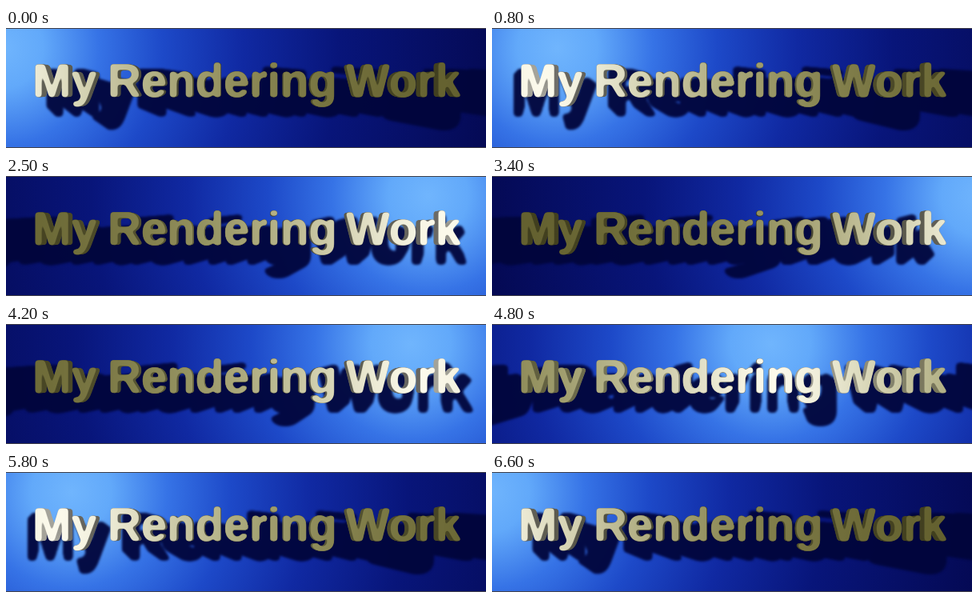
Write an HTML page with a canvas that moves like this. It is 600 px wide and 150 px high and loops after 6700 ms.

```html
<!DOCTYPE html>
<html lang="en">
<head>
<meta charset="utf-8">
<title>My Rendering Work</title>
<style>
html, body { margin: 0; width: 600px; height: 150px; overflow: hidden; background: #02065a; }
canvas { display: block; }
</style>
</head>
<body>
<canvas id="stage" width="600" height="150"></canvas>
<script>
const W = 600, H = 150, PAD = 12, RES = 2;
const LOOP = 6700, TURN = 3300;
const VIEW = { x: 300, y: 75 };
const BACK = 0.975;                       // scale of the rear of the lettering
const CAST = [1.21, 1.36], LIGHT_Y = 18;  // shadow scales of rear and front

function layer(w, h) {
  const c = document.createElement('canvas');
  c.width = w;
  c.height = h;
  return c.getContext('2d');
}
const ctx = document.getElementById('stage').getContext('2d');
const shade = layer(W + 2 * PAD, H + 2 * PAD);
const tint = layer(W * RES, H * RES);
const mask = makeMask();

// Lettering with corners rounded by blurring and thresholding
function makeMask() {
  const raw = layer(W * RES, H * RES), soft = layer(W * RES, H * RES);
  raw.scale(RES, RES);
  raw.font = 'bold 58px "Liberation Sans", Arial, sans-serif';
  for (const [word, x] of [['My', 33], ['Rendering', 127], ['Work', 425]]) {
    raw.fillText(word, x, 86);
  }
  soft.filter = 'blur(3.5px)';
  soft.drawImage(raw.canvas, 0, 0);
  const img = soft.getImageData(0, 0, W * RES, H * RES);
  for (let i = 3; i < img.data.length; i += 4) {
    img.data[i] = Math.max(0, Math.min(255, (img.data[i] - 112) * 6 + 128));
  }
  soft.putImageData(img, 0, 0);
  return soft.canvas;
}

const mix = (a, b, u) => a + (b - a) * u;
const lightX = t => mix(-30, 640, (1 - Math.cos(Math.PI * Math.min(t / TURN, 2))) / 2);

function gold(d, k) {
  const u = Math.exp(-Math.pow(Math.abs(d) / 300, 1.5));
  const rgb = [mix(90, 252, u), mix(87, 250, u), mix(42, 236, Math.pow(u, 1.25))];
  return `rgb(${rgb.map(v => Math.round(v * k))})`;
}

// Colour the lettering by distance from the light
function paint(lx, gain) {
  const g = tint.createLinearGradient(0, 0, W * RES, 0);
  for (let i = 0; i <= 30; i++) {
    const x = i * W / 30;
    g.addColorStop(i / 30, gold(x - lx, gain(x)));
  }
  tint.globalCompositeOperation = 'copy';
  tint.drawImage(mask, 0, 0);
  tint.globalCompositeOperation = 'source-in';
  tint.fillStyle = g;
  tint.fillRect(0, 0, W * RES, H * RES);
}

// Draw a full-stage picture scaled about a fixed point
function scaled(c, img, s, x, y) {
  c.drawImage(img, x * (1 - s), y * (1 - s), W * s, H * s);
}

function wall(lx) {
  const x = mix(lx, VIEW.x, 0.08);
  const g = ctx.createRadialGradient(x, 25, 0, x, 25, 640);
  [[0, '#70b5fd'], [50, '#62a9fa'], [120, '#3673e6'], [200, '#1d49c8'],
   [300, '#1029a2'], [420, '#08157a'], [640, '#040850']]
    .forEach(([d, color]) => g.addColorStop(d / 640, color));
  ctx.fillStyle = g;
  ctx.fillRect(0, 0, W, H);
}

function shadow(lx) {
  const steps = 60;
  shade.clearRect(0, 0, W + 2 * PAD, H + 2 * PAD);
  shade.save();
  shade.translate(PAD, PAD);
  for (let i = 0; i <= steps; i++) {
    scaled(shade, mask, mix(...CAST, i / steps), lx, LIGHT_Y);
  }
  shade.restore();
  shade.globalCompositeOperation = 'source-in';
  shade.fillStyle = '#02063c';
  shade.fillRect(0, 0, W + 2 * PAD, H + 2 * PAD);
  shade.globalCompositeOperation = 'source-over';
  ctx.filter = 'blur(1.5px)';
  ctx.globalAlpha = 0.95;
  ctx.drawImage(shade.canvas, -PAD, -PAD);
  ctx.globalAlpha = 1;
  ctx.filter = 'none';
}

function letters(lx) {
  paint(lx, x => (x < VIEW.x) === (x < lx) ? 0.66 : 0.42);
  for (let s = BACK; s < 1; s += 0.0025) {
    scaled(ctx, tint.canvas, s, VIEW.x, VIEW.y);
  }
  paint(lx, () => 1);
  scaled(ctx, tint.canvas, 1, 0, 0);
}

function draw(t) {
  const lx = lightX(t);
  wall(lx);
  shadow(lx);
  letters(lx);
  ctx.fillStyle = '#45434a';
  ctx.fillRect(0, 0, W, 1);
  ctx.fillRect(0, H - 1, W, 1);
}

let shown = -1;
function tick() {
  const t = Math.floor(performance.now() % LOOP / 100) * 100;
  if (t !== shown) draw(shown = t);
  requestAnimationFrame(tick);
}
tick();
</script>
</body>
</html>
```
